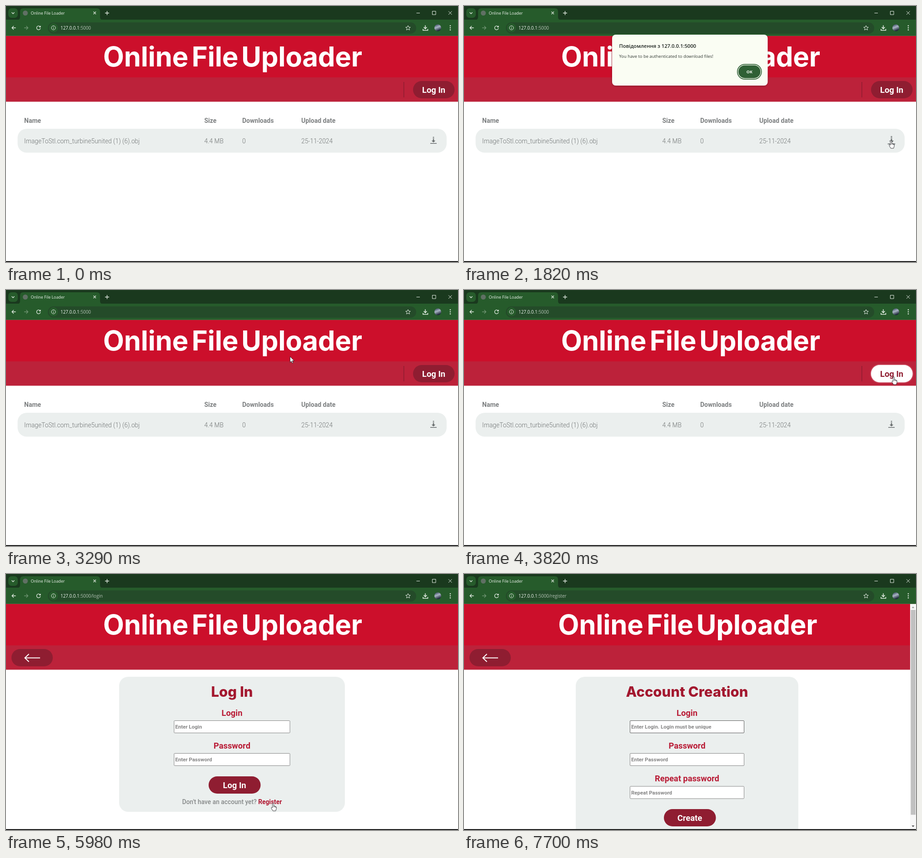
Recreate the animation shown at these times as an HTML page. Size 995 by 563 pixels, loop 8000 ms.

```html
<!DOCTYPE html>
<html lang="en">
<head>
<meta charset="utf-8">
<title>Online File Loader</title>
<style>
  html, body { margin: 0; width: 100%; height: 100%; overflow: hidden; background: #fff; }
  svg { display: block; width: 100vw; height: 100vh; font-family: Roboto, sans-serif; }
  .ui { font-family: "Open Sans", sans-serif; }
  .line { fill: none; stroke: #e6eee6; stroke-width: 1.3; }
  .thin { stroke-width: 1; }
  .mid { text-anchor: middle; }
  .title { font: 700 60px Inter, sans-serif; letter-spacing: -.3px; fill: #fff; text-anchor: middle; }
  .head { font: 700 14px Roboto, sans-serif; fill: #7c7f80; }
  .cell { font: 300 13.8px Roboto, sans-serif; fill: #707474; }
  .button { font: 700 18.4px Roboto, sans-serif; fill: #fff; }
  .heading { font: 800 31px Inter, sans-serif; fill: #a3182f; }
  .label { font: 700 18.3px Roboto, sans-serif; fill: #b91c36; }
  .hint { font: 700 11.5px Roboto, sans-serif; fill: #858585; }
  .note { font: 500 13.8px Roboto, sans-serif; fill: #858888; }
  .box { fill: #fff; stroke: #858585; }
  .wine { fill: #8f1d31; }
  .card { fill: #ebefee; }
</style>
</head>
<body>
<svg viewBox="0 0 995 563" preserveAspectRatio="none">
  <defs>
    <linearGradient id="avatar" x2=".4" y2="1">
      <stop stop-color="#27334d"/><stop offset=".5" stop-color="#a9b5c4"/><stop offset="1" stop-color="#1d2638"/>
    </linearGradient>
    <filter id="glow" x="-20%" y="-40%" width="140%" height="180%"><feDropShadow dx="0" dy="0" stdDeviation="1.8" flood-color="#fff" flood-opacity=".8"/></filter>
    <filter id="shade" x="-10%" y="-10%" width="120%" height="130%"><feDropShadow dx="0" dy="1" stdDeviation="2" flood-opacity=".3"/></filter>
  </defs>
  <rect width="995" height="563" fill="#fff"/>

  <!-- browser window -->
  <rect width="995" height="31" fill="#1a391e"/>
  <rect y="30" width="995" height="36" fill="#265b2b"/>
  <rect y="65" width="995" height="1" fill="#4a6b40"/>
  <path d="M24 31q7 0 7-7V12q0-7 7-7H200q7 0 7 7v12q0 7 7 7Z" fill="#265b2b"/>
  <rect x="5" y="5" width="21" height="21" rx="7" fill="#265b2b"/>
  <rect x="92" y="36" width="811" height="25" rx="12.5" fill="#244b29"/>
  <circle cx="104.500" cy="48" r="10" fill="#265b2b"/>
  <g class="line">
    <path d="M12.500 14l3 3 3-3M192.500 12.500l5.500 5.500m0-5.500l-5.500 5.500M218 15.500h9m-4.500-4.500v9"/>
    <path class="thin" d="M903.500 15.500h7.500M938.500 11.500h7.500v7.500h-7.500zM974 11.500l7.500 7.500m0-7.500l-7.500 7.500"/>
    <path d="M21.500 48h-8.500m4-4l-4 4 4 4"/>
    <path d="M40 48h8.500m-4-4l4 4-4 4" opacity=".38"/>
    <path d="M75 45.500A4.200 4.200 0 1 0 75.800 48.800M75.800 43.500v2.800h-2.800"/>
    <circle cx="104.500" cy="48" r="4.500" class="thin"/>
    <path class="thin" d="M104.500 47.300v3.200m0-5v-1"/>
    <path class="thin" d="M885 43l1.500 3.400 3.700.4-2.800 2.400.9 3.600-3.300-1.900-3.300 1.900.9-3.600-2.800-2.400 3.700-.4z"/>
    <path stroke-width="1.600" d="M923 42.500v7.500m-3.500-3.500l3.500 3.500 3.500-3.500M918 50.500v3h10.500v-3"/>
  </g>
  <g fill="#e6eee6"><circle cx="978" cy="43.500" r="1.300"/><circle cx="978" cy="48" r="1.300"/><circle cx="978" cy="52.500" r="1.300"/></g>
  <circle cx="950.500" cy="48" r="7.500" fill="url(#avatar)"/>
  <circle cx="42.500" cy="15.500" r="5.500" fill="#607064"/>
  <g class="ui" fill="#f2f7f2">
    <text x="54.500" y="19" font-size="8.900">Online File Loader</text>
    <text x="120" y="51.600" font-size="9.900">127.0.0.1<tspan id="path" fill="#b4c2b5"></tspan></text>
  </g>

  <!-- site header -->
  <rect y="66" width="995" height="92" fill="#cc0f2b"/>
  <rect y="157" width="995" height="53.500" fill="#bc223a"/>
  <g id="title" class="title">
    <text x="307.500" y="133">Online</text><text x="460" y="133">File</text><text x="651" y="133">Uploader</text>
  </g>

  <g id="home">
    <rect x="875" y="167" width="1.500" height="34" class="wine"/>
    <rect id="loginPill" x="896" y="165" width="91.500" height="38" rx="19"/>
    <text id="loginText" class="button mid" x="941.500" y="191">Log In</text>
    <g class="head">
      <text x="40" y="256.500">Name</text><text x="436.500" y="256.500">Size</text>
      <text x="520" y="256.500">Downloads</text><text x="650" y="256.500">Upload date</text>
    </g>
    <rect class="card" x="25.500" y="270" width="944.500" height="52.500" rx="20"/>
    <g class="cell">
      <text x="40" y="301.500">ImageToStl.com_turbine5united (1) (6).obj</text>
      <text x="436.500" y="301.500">4.4 MB</text><text x="520" y="301.500">0</text><text x="650" y="301.500">25-11-2024</text>
    </g>
    <path id="download" fill="#666b6c" d="M-1.300-7.800h2.600v1.500h-2.600zM-1.300-5.300h2.600v1.500h-2.600zM-1.300-2.800h2.600v3.300h3L0 4.600-4.300.5h3zM-7 6h14v1.500H-7z"/>
  </g>

  <g id="back">
    <rect x="12" y="165" width="91" height="38" rx="19" class="wine"/>
    <path d="M75 184.500H42m8.500-8.500l-9 8.500 9 8.500" fill="none" stroke="#fff" stroke-width="2"/>
  </g>
  <g id="login"></g>
  <g id="register"></g>

  <g id="dialog" class="ui">
    <rect x="326" y="63" width="342.500" height="112" rx="8" fill="#fafdf3" filter="url(#shade)"/>
    <text x="341.500" y="92" font-size="11.200" font-weight="600" fill="#1e2420">Повідомлення з 127.0.0.1:5000</text>
    <text x="341.500" y="114" font-size="9.400" fill="#333a35">You have to be authenticated to download files!</text>
    <rect x="601.800" y="128.300" width="53" height="32.500" rx="16.200" fill="none" stroke="#2f6035" stroke-width="1.700"/>
    <rect x="604" y="130.500" width="48.600" height="28.200" rx="14" fill="#2f6035"/>
    <text class="mid" x="628.300" y="148" font-size="9" font-weight="700" fill="#f5faf3">OK</text>
  </g>

  <rect y="561" width="995" height="2" fill="#111"/>
  <g id="cursor" fill="#fff" stroke="#26262c" stroke-width=".9" stroke-linejoin="round">
    <path id="arrow" d="M.3.300V13.200L3.200 10.500 5.200 15 7.100 14.100 5.200 9.700H9.400Z"/>
    <path id="hand" d="M-1.400 10V1.300a1.400 1.400 0 0 1 2.800 0V6.200Q3 5.400 4 6.900 5.600 6.300 6 8 7.500 8 7.300 9.800L7 12.500 5.600 17H-.4L-3.600 11.800Q-4.600 9.600-3.300 9.200-2.400 9-1.400 10ZM1.400 6.200V9M4 6.900V9.300M6 8V9.800"/>
  </g>
</svg>
<script>
const LOOP = 8000, FRAME = 80;
const DIALOG_OPEN = 1750, DIALOG_CLOSE = 3290, LOGIN_AT = 4160, REGISTER_AT = 6230, FOCUS_AT = 6700;
const $ = id => document.getElementById(id);

const field = (cx, width, y, label, hint, id = '') => `
  <text class="label mid" x="${cx}" y="${y - 10.5}">${label}</text>
  <rect ${id && `id="${id}"`} class="box" x="${cx - width / 2 + .5}" y="${y + .5}" width="${width - 1}" height="27" rx="1.5"/>
  <text class="hint" x="${cx - width / 2 + 3}" y="${y + 18}">${hint}</text>`;
const submit = (cx, y, text) => `
  <rect class="wine" x="${cx - 57}" y="${y}" width="114.5" height="38" rx="19"/>
  <text class="button mid" x="${cx}" y="${y + 26}">${text}</text>`;
const card = (cx, width, height, title) => `
  <rect class="card" x="${cx - width / 2}" y="226" width="${width}" height="${height}" rx="20"/>
  <text class="heading mid" x="${cx}" y="270">${title}</text>`;

$('login').innerHTML = card(497.5, 497, 297, 'Log In')
  + field(497.5, 256, 322, 'Login', 'Enter Login')
  + field(497.5, 256, 394, 'Password', 'Enter Password')
  + submit(503, 445, 'Log In')
  + `<text class="note mid" x="497.500" y="506">Don't have an account yet? <tspan fill="#b0152f" font-weight="700">Register</tspan></text>`;

$('register').innerHTML = card(491, 490, 370, 'Account Creation')
  + field(491, 252, 322, 'Login', 'Enter Login. Login must be unique', 'focusBox')
  + field(491, 252, 394, 'Password', 'Enter Password')
  + field(491, 252, 466.5, 'Repeat password', 'Repeat Password')
  + submit(497, 517, 'Create')
  + `<rect id="caret" x="368" y="329" width="1" height="14" fill="#222"/>
     <rect x="982" y="66" width="13" height="495" fill="#f7f7f7"/>
     <rect x="983.500" y="79" width="10.500" height="450.500" fill="#c1c1c1"/>
     <path d="M985.500 75l3-3.500 3 3.500z" fill="#a0a0a0"/><path d="M985.500 553l3 3.500 3-3.500z" fill="#505050"/>`;

// Pointer track: time, x, y, shape from that time on
const track = [
  [0, 202, 311, ''], [330, 202, 311, 'arrow'], [1120, 929, 299, 'arrow'], [1190, 929, 299, 'arrow'],
  [1270, 933, 300, 'hand'], [1430, 940, 296, 'hand'], [1830, 940, 296, 'hand'], [2150, 685, 204, 'hand'],
  [2310, 648, 170, 'arrow'], [2550, 632, 150, 'arrow'], [2710, 625, 146, 'arrow'], [3290, 625, 146, 'arrow'],
  [3700, 925, 187, 'hand'], [3820, 946, 191, 'hand'], [LOGIN_AT, 946, 191, 'arrow'], [4400, 946, 191, 'arrow'],
  [4710, 444, 389, 'arrow'], [4860, 444, 389, 'arrow'], [5030, 438, 391, 'arrow'], [5530, 438, 391, 'arrow'],
  [5600, 465, 412, ''], [5680, 510, 440, 'hand'], [5830, 588, 505, 'hand'], [5980, 588, 504, 'hand'],
  [REGISTER_AT, 588, 504, 'arrow'], [6470, 588, 504, 'arrow'], [6640, 460, 350, ''], [LOOP, 460, 350, '']
];

function pointerAt(t) {
  const next = track.findIndex(key => key[0] > t);
  const [t0, x0, y0, shape] = track[next - 1], [t1, x1, y1] = track[next];
  const p = Math.floor((t - t0) / FRAME) * FRAME / (t1 - t0);
  return { x: x0 + (x1 - x0) * p, y: y0 + (y1 - y0) * p, shape };
}

const show = (id, on) => { $(id).style.display = on ? '' : 'none'; };
const set = (id, name, value) => $(id).setAttribute(name, value);

function render(t) {
  const page = t < LOGIN_AT ? 'home' : t < REGISTER_AT ? 'login' : 'register';
  for (const id of ['home', 'login', 'register']) show(id, id === page);
  show('back', page !== 'home');
  show('dialog', t >= DIALOG_OPEN && t < DIALOG_CLOSE);
  $('path').textContent = ':5000' + (page === 'home' ? '' : '/' + page);
  set('title', 'transform', `translate(${page === 'register' ? -6.5 : 0} 0)`);

  const iconHover = t >= 1270 && t < DIALOG_CLOSE;
  set('download', 'transform', `translate(941 295.500) scale(${iconHover ? 1.18 : 1})`);
  const pillHover = t >= 3700;
  set('loginPill', 'fill', pillHover ? '#fff' : '#8f1d31');
  set('loginPill', 'filter', pillHover ? 'url(#glow)' : 'none');
  $('loginText').style.fill = pillHover ? '#8f1d31' : '#fff';

  const focused = t >= FOCUS_AT;
  $('focusBox').style.stroke = focused ? '#5c5c5c' : '';
  show('caret', focused && Math.floor((t - FOCUS_AT) / 500) % 2 === 1);

  const { x, y, shape } = pointerAt(t);
  set('cursor', 'transform', `translate(${x} ${y})`);
  show('arrow', shape === 'arrow');
  show('hand', shape === 'hand');
}

const start = performance.now();
function tick() {
  render((performance.now() - start) % LOOP);
  requestAnimationFrame(tick);
}
tick();
</script>
</body>
</html>
```
